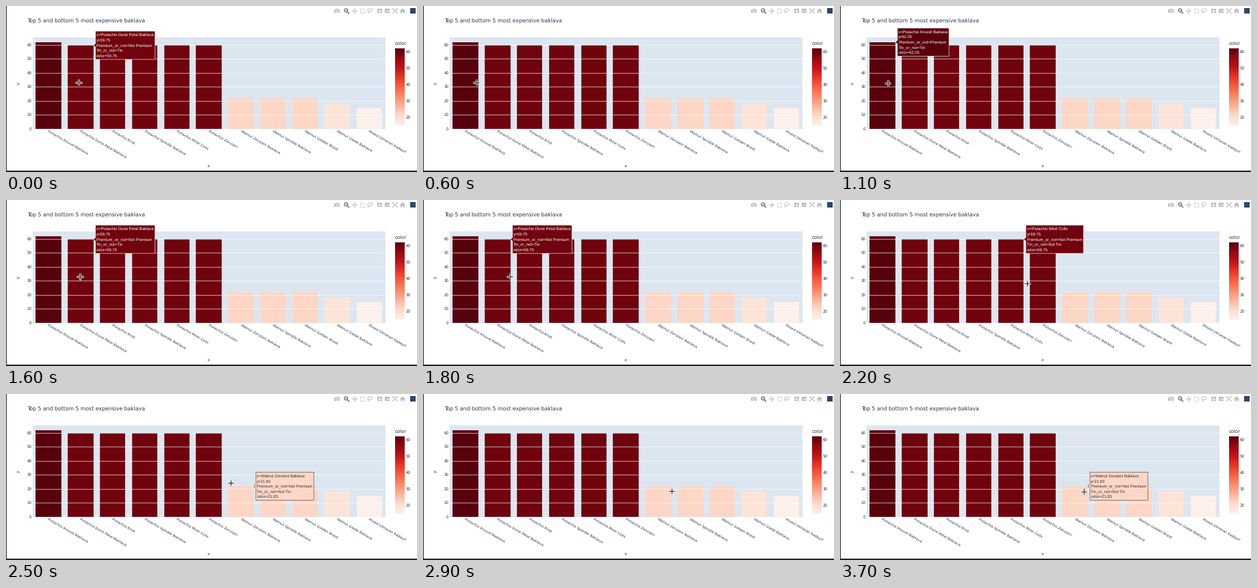
A matplotlib script for the animation above (3.8 s loop, 600 by 243 pixels).

```python
import matplotlib.pyplot as plt
import numpy as np
from matplotlib.animation import FuncAnimation
from matplotlib.colors import LinearSegmentedColormap
from matplotlib.patches import Circle, Ellipse, Polygon, Rectangle

W, H = 600, 243
FRAMES, STEP = 38, 100
INK, PANEL, ICON = "#26334f", "#dce6f1", "#b9bdc4"

NAMES = [
    "Pistachio Anuvel Baklava", "Pistachio Dune Petal Baklava",
    "Pistachio Knot", "Pistachio Spindle Baklava",
    "Pistachio Mirel Coils", "Pistachio Zerulani",
    "Walnut Zerulani Baklava", "Walnut Spindle Baklava",
    "Walnut Golden Braid", "Walnut Glade Baklava", "Mixed Ulmaran Kadayif",
]
PRICES = [62.05] + [59.75] * 5 + [21.83] * 3 + [18.5, 15.0]
PREMIUM = {0}
TIN = {0, 1, 2, 3}

LEFT, TOP, RIGHT, BASE = 38.5, 46, 553.8, 179.5
PITCH = (RIGHT - LEFT) / len(NAMES)
BAR = 0.8 * PITCH
UNIT = 2.042

REDS = LinearSegmentedColormap.from_list("reds", [
    "#fdefe9", "#fddccd", "#fbb49b", "#fb8a6b", "#f96044",
    "#eb3526", "#c0151a", "#98080f", "#58000b"])

# (first frame, last frame, hovered bar)
HOVERS = [(0, 3, 1), (7, 13, 0), (15, 18, 1), (19, 19, 2), (20, 20, 3),
          (21, 22, 4), (23, 23, 5), (25, 28, 6), (33, 37, 6)]

# pointer path: frame, x, y
PATH = np.array([
    (0, 106, 111.5), (6, 78, 111.5), (9, 69, 112), (11, 69.5, 112.5),
    (12, 70, 112), (18, 127, 111.5), (22, 273, 122), (24, 319, 127),
    (29, 363, 142), (31, 363, 142.5), (37, 356, 142.5)])

plt.rcParams.update({"font.family": "DejaVu Sans", "text.hinting": "none"})
fig = plt.figure(figsize=(W / 72, H / 72), dpi=72, facecolor="white")
ax = fig.add_axes([0, 0, 1, 1])


def tint(price):
    lo, hi = min(PRICES), max(PRICES)
    return REDS((price - lo) / (hi - lo))


def y_of(value):
    return BASE - UNIT * value


def bar_x(i):
    return LEFT + PITCH * (i + 0.5)


def label(x, y, text, size, color=INK, **kw):
    return ax.text(x, y, text, size=size, color=color, **kw)


def rect(x0, y0, x1, y1, color, **kw):
    kw.setdefault("lw", 0)
    return ax.add_patch(Rectangle((x0, y0), x1 - x0, y1 - y0, fc=color, **kw))


def line(xs, ys, color, lw, **kw):
    return ax.plot(xs, ys, color=color, lw=lw, **kw)[0]


def draw_chart():
    rect(LEFT, TOP, RIGHT, BASE, PANEL)
    for v in range(0, 61, 10):
        y = y_of(v)
        line([LEFT, RIGHT], [y, y], "white", 0.9 if v == 0 else 0.6)
        label(37.3, y + 2, str(v), 5.5, ha="right")
    for i, (name, price) in enumerate(zip(NAMES, PRICES)):
        x = bar_x(i)
        rect(x - BAR / 2, y_of(price), x + BAR / 2, BASE, tint(price),
             ec=PANEL, lw=0.25)
        label(x - 1.4, 184.3, name, 5.4, rotation=-30, rotation_mode="anchor")
    label(31, 23, "Top 5 and bottom 5 most expensive baklava", 7.75)
    label(296, 236, "x", 6.4, ha="center")
    label(18, 113, "y", 6.4, rotation=90, ha="center", va="center")


def draw_colorbar():
    top, bottom = 62, 175
    ax.imshow(np.linspace(1, 0, 256)[:, None], cmap=REDS, aspect="auto",
              extent=(568, 582, bottom, top))
    label(568, 56.5, "color", 6.9)
    lo, hi = min(PRICES), max(PRICES)
    for v in range(20, 61, 10):
        y = top + (bottom - top) * (hi - v) / (hi - lo)
        label(583.3, y + 2, str(v), 5.5)


def draw_toolbar():
    y = 7
    # camera
    rect(479.3, 4.8, 486.9, 10.4, ICON)
    rect(481.5, 3.8, 484.7, 5.2, ICON)
    ax.add_patch(Circle((483.1, 7.6), 1.7, fc=ICON, ec="white", lw=0.8))
    # zoom
    ax.add_patch(Circle((496.4, 6.4), 2.4, fc="none", ec="#6c7480", lw=1.3))
    line([498.3, 500.6], [8.3, 10.6], "#6c7480", 1.6)
    line([495.3, 497.5], [6.4, 6.4], "#6c7480", 0.6)
    # pan
    line([505.5, 511.5], [y, y], ICON, 0.9)
    line([508.5, 508.5], [4, 10], ICON, 0.9)
    for dx, dy in ((1, 0), (-1, 0), (0, 1), (0, -1)):
        tip = np.array([508.5 + 4 * dx, y + 4 * dy])
        back, side = np.array([dx, dy]) * 1.6, np.array([dy, dx]) * 1.4
        ax.add_patch(Polygon([tip, tip - back + side, tip - back - side],
                             fc=ICON, lw=0))
    # box select and lasso
    rect(516.8, 4, 523, 10.2, "none", ec=ICON, lw=0.9, ls=(0, (1.4, 0.8)))
    ax.add_patch(Ellipse((531.2, 6.2), 6.8, 4.6, angle=-12, fc="none",
                         ec=ICON, lw=0.9))
    line([528.8, 529.4, 528.6], [8, 9.3, 10.8], ICON, 0.9)
    # zoom in and out
    for x in (545.4, 556.6):
        rect(x - 3.4, 3.7, x + 3.4, 10.5, ICON)
        line([x - 2, x + 2], [7.1, 7.1], "white", 1)
    line([545.4, 545.4], [5.1, 9.1], "white", 1)
    # autoscale
    for s in (1, -1):
        line([564.8, 571], [y - 3 * s, y + 3 * s], ICON, 1.1)
        for t in (1, -1):
            cx, cy = 567.9 + 3.4 * s, y + 3.4 * t
            ax.add_patch(Polygon([(cx, cy), (cx - 2.2 * s, cy),
                                  (cx, cy - 2.2 * t)], fc=ICON, lw=0))
    # home
    ax.add_patch(Polygon([(574.7, 7.4), (578.9, 3.3), (583.1, 7.4),
                          (581.8, 7.4), (581.8, 10.6), (579.8, 10.6),
                          (579.8, 8.2), (578, 8.2), (578, 10.6),
                          (576, 10.6), (576, 7.4)], fc=ICON, lw=0))
    rect(590, 3, 597.6, 10.8, "#31456b")


def make_tip(i):
    price = PRICES[i]
    dark = price > 40
    ink, edge = ("white", "white") if dark else ("#333333", "#444444")
    rows = [f"x={NAMES[i]}", f"y={price}",
            "Premium_or_not=" + ("Premium" if i in PREMIUM else "Not Premium"),
            "Tin_or_not=" + ("Tin" if i in TIN else "Not Tin"),
            f"color={price}"]
    x, y = bar_x(i) + BAR / 2, y_of(price)
    x0 = x + 3.2
    texts = [label(x0 + 1.5, y + 7.7 * (k - 2) + 2.1, row, 5.93, ink,
                   family="Liberation Sans", zorder=6)
             for k, row in enumerate(rows)]
    x1 = x0 + 3.2 + max(t.get_window_extent().width for t in texts)
    box = Polygon([(x, y), (x0, y - 2.7), (x0, y - 20.6), (x1, y - 20.6),
                   (x1, y + 20.6), (x0, y + 20.6), (x0, y + 2.7)],
                  fc=tint(price), ec=edge, lw=0.6, zorder=5)
    ax.add_patch(box)
    return [box] + texts


draw_chart()
draw_colorbar()
draw_toolbar()
rect(0, 0, 1.3, H, "#23232b")
rect(0, 241.2, W, H, "#23232b")
ax.set(xlim=(0, W), ylim=(H, 0))
ax.axis("off")

tips = {i: make_tip(i) for i in sorted({h[2] for h in HOVERS})}
pointer = [(line([], [], color, lw, zorder=z, solid_capstyle="butt"), arm)
           for color, lw, arm, z in (("#f4f4f4", 2.6, 4.9, 8),
                                     ("#222222", 1.0, 4.2, 9))]


def draw(n):
    hovered = next((bar for a, b, bar in HOVERS if a <= n <= b), None)
    for i, parts in tips.items():
        for part in parts:
            part.set_visible(i == hovered)
    x, y = (np.interp(n, PATH[:, 0], PATH[:, k]) for k in (1, 2))
    for mark, arm in pointer:
        mark.set_data([x - arm, x + arm, np.nan, x, x],
                      [y, y, np.nan, y - arm, y + arm])
    return []


anim = FuncAnimation(fig, draw, frames=FRAMES, interval=STEP,
                     init_func=lambda: draw(0), repeat=True, repeat_delay=0)
plt.show()
```
